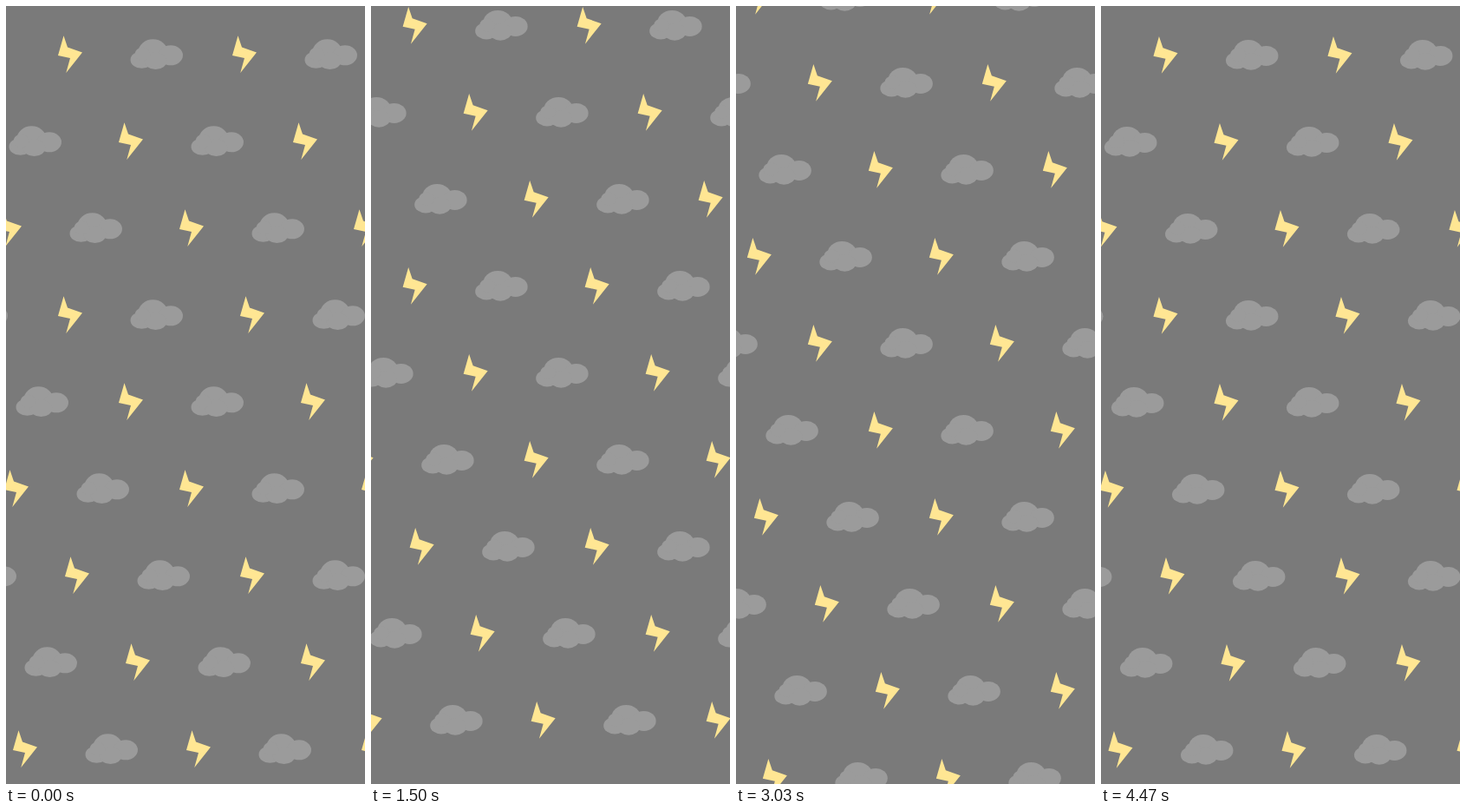
Recreate the animation shown at these times as an HTML page. Size 414 by 896 pixels, loop 4500 ms.

```html
<!DOCTYPE html>
<html lang="en">
<head>
<meta charset="utf-8">
<title>Storm pattern</title>
<style>
  html, body { margin: 0; width: 100%; height: 100%; overflow: hidden; background: #7a7a7a; }
  svg { display: block; width: 414px; height: 896px; }
</style>
</head>
<body>
<svg viewBox="0 0 414 896">
  <defs>
    <g id="pair">
      <path fill="#ffe693" d="M6.5 0 11 13.3 28 19.3 9.3 42.7 14 25.8 0 22.8Z"/>
      <g fill="#9b9b9b" transform="translate(83.5 4)">
        <ellipse cx="26" cy="15" rx="17" ry="15"/>
        <ellipse cx="46.5" cy="18.5" rx="14" ry="11.5"/>
        <ellipse cx="13" cy="23.7" rx="13" ry="9.8"/>
        <ellipse cx="29" cy="25" rx="13" ry="9.7"/>
        <ellipse cx="14" cy="17" rx="9" ry="7.5"/>
      </g>
    </g>
  </defs>
  <g id="pattern"></g>
</svg>
<script>
  const LOOP = 4500, STEP_X = 70, STEP_Y = 100, TOP = 34.3, ROWS = 10;
  const diagonals = [261, 60, -150, -352, -552]; // x of each diagonal in the first row
  const pattern = document.getElementById('pattern');

  let markup = '';
  for (let row = 0; row < ROWS; row++) {
    for (const x of diagonals) {
      markup += `<use href="#pair" x="${x + row * STEP_X}" y="${TOP + row * STEP_Y}"/>`;
    }
  }
  pattern.innerHTML = markup;

  // Sliding by one diagonal step makes the loop seamless.
  function draw() {
    const progress = performance.now() % LOOP / LOOP;
    pattern.setAttribute('transform', `translate(${-STEP_X * progress} ${-STEP_Y * progress})`);
    requestAnimationFrame(draw);
  }
  draw();
</script>
</body>
</html>
```
